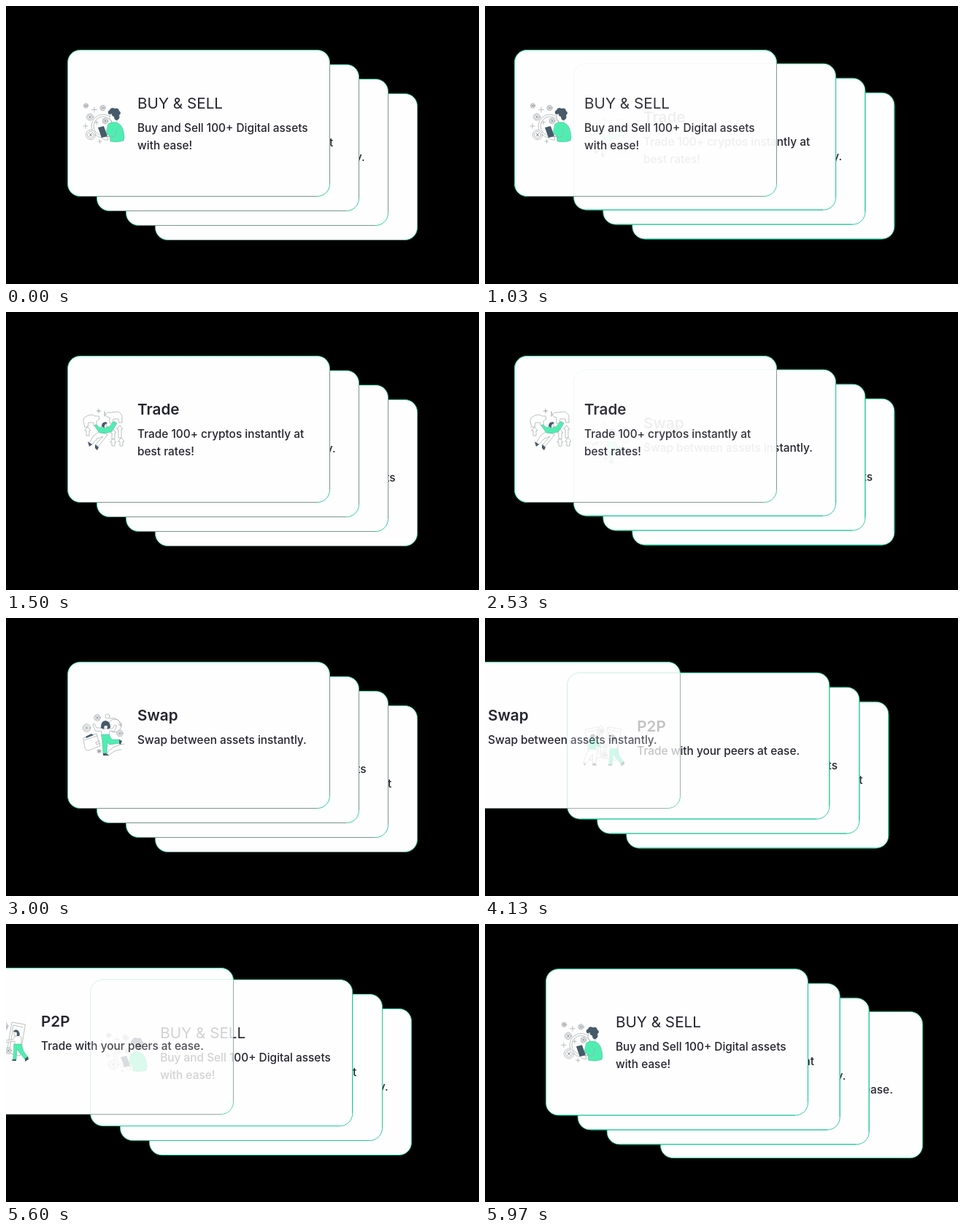
An HTML page for the animation above (6010 ms loop, 648 by 382 pixels).

```html
<!DOCTYPE html>
<html lang="en">
<head>
<meta charset="utf-8">
<title>Card stack</title>
<style>
html, body { margin: 0; width: 100%; height: 100%; overflow: hidden; background: #000; }
svg { display: block; width: 648px; height: 382px; }
text { font-family: Inter, "Open Sans", sans-serif; fill: #25252e; }
.title { font-size: 20.7px; font-weight: 600; }
.body { font-size: 15.4px; font-weight: 500; }
.panel { fill: #fefefe; stroke: #1fc795; stroke-width: .9; }
.edge { fill: none; stroke: var(--edge); stroke-width: .9; }
.art { fill: none; stroke: #a3a6a8; stroke-width: .7; stroke-linejoin: round; stroke-linecap: round; }
.art .w { fill: #fefefe; }
.art .g { fill: #50edb2; stroke: #3fae89; stroke-width: .5; }
.art .d { fill: #465a69; stroke: none; }
.art .k { stroke: #465a69; }
</style>
</head>
<body>
<svg id="stage" viewBox="0 0 648 382"><defs id="defs"></defs></svg>
<script>
const NS = 'http://www.w3.org/2000/svg';
const STEP = 100 / 3, LOOP = 6010, CYCLE = 45, HOLD = 30, REACH = 660;

const coin = (x, y, r) =>
  `<circle class="w" cx="${x}" cy="${y}" r="${r}"/><circle cx="${x}" cy="${y}" r="${r * .68}"/>` +
  `<path class="k" d="M${x - r * .25} ${y - r * .3}l${r * .5} ${r * .6}m0 ${-r * .6}l${-r * .5} ${r * .6}"/>`;
const spark = (x, y, r) => `<path d="M${x - r} ${y}h${2 * r}M${x} ${y - r}v${2 * r}"/>`;
const arrow = (x, y, h) =>
  `<path class="w" d="M${x} ${y}l4 5h-2v${h}h-4v${-h}h-2z"/>`;
const shape = (cls, d) => `<path class="${cls}" d="${d}"/>`;

const buyArt =
  '<circle cx="133" cy="165" r="16"/><circle cx="133" cy="165" r="13"/>' +
  coin(109.5, 137, 3.2) + coin(132.5, 140, 3.7) + coin(115, 152.5, 4.8) + coin(116, 177, 6.7) + coin(136, 158, 4) +
  spark(121, 142.5, 3.5) + spark(109, 165, 3.2) + spark(128.5, 186, 2.5) + spark(124, 160, 2.5) +
  shape('w', 'M143 149q-2 5 0 8l2 1v4l7 0v-10z') +
  shape('d', 'M141 149q-3-4 1-6q2-5 7-2q5-2 6 3q4 3 0 6q2 5-3 7q-4 0-4-5q-3 0-3-4z') +
  shape('g', 'M140 162q7-4 13-1q6 2 8 12q2 8 0 12q-8 3-18 1l-1-8l-5-3z') +
  shape('w', 'M131 178l8 2l1 4q-6 1-9-3z') +
  shape('d', 'M126 167l8-2l5 14l-8 2z') +
  shape('', 'M151 170q0 7-3 10l-10-1');

const tradeArt =
  shape('w', 'M107 154q-3-7 2-10q8-5 13-1l5 0l1 4l-4 3v6h-4v-4h-7l-1 6h-4z') +
  shape('w', 'M135 143q2-6 9-5l9-1q6 2 6 8v7h-4l-1-5h-7l-2 6h-3v-8q-4 0-6-4l-1-4z') +
  spark(127, 136, 3) + spark(127, 136, 1.5) +
  arrow(112, 158, 7) + arrow(147, 161, 9) + arrow(156, 156, 12) + arrow(147, 174, 5) + arrow(158, 173, 6) +
  shape('w', 'M128 164l-8 6l-6 10l4 2l7-8l8-3l-10 11l3 3l13-16z') +
  shape('d', 'M112 178l6 4l-4 3zM122 182l5 4l-2 4l-3-3z') +
  shape('g', 'M124 155l4 4q5-3 13-1l7-8l4 3l-7 11q-8 4-17 2l-7-10z') +
  shape('w', 'M134 153q5-1 4 6h-4z') +
  shape('d', 'M131 157q0-6 6-6l2 2q-5 1-4 6z');

const swapArt =
  '<circle cx="149" cy="148" r="9"/>' + shape('', 'M142 138q12-3 15 10l2-3m-2 3l-3-2') +
  coin(125, 137, 4.4) + coin(110.5, 151, 5.5) + coin(156, 158.5, 4.4) + coin(127.5, 183, 2.5) +
  '<circle cx="139" cy="135" r="3"/>' +
  shape('w', 'M106 165l18-6l5 17l-16 6q-4 0-5-4z') + shape('', 'M107 168l18-6m-2 9l5-2m-5 2l1 3l5-2') +
  shape('d', 'M109 163l8-4l3 2l-10 4z') +
  shape('w', 'M132 151l-8 0l-3-6l-2 1l3 9l9 1l0 7h10l1-8l6 1l4-8l-3-1l-3 5z') +
  shape('w', 'M134 146h5v6h-5z') +
  shape('d', 'M130 151q0-10 6-10q7 0 7 10l-4 2l0-5h-4l-1 5z') +
  shape('g', 'M131 160h10l4 7l11 0l0 5l-14 2l-3-3l-1 15h-5l-1-16z') +
  shape('d', 'M155 167l4 2l-2 5l-2-1zM133 186h5l3 3h-8z') +
  shape('', 'M137 187q8-12 25-14M140 190q7-9 18-9');

const peerArt =
  shape('w', 'M109 139l18-4l4 41l-15 5z') + shape('w', 'M158 138l-18-3l-7 42l18 4z') +
  shape('', 'M112 142l13-3l3 34M155 142l-13-3l-5 34M113 147l8 4l5-4') +
  shape('w', 'M130.500 133l5 7l-5 9l-5-9z') + coin(130.5, 141, 3.5) + coin(135, 174, 4.5) + coin(109, 153, 4) +
  shape('w', 'M115 164h10l0 10l-2 11h-4l0-13l-8 13l-4-2z') +
  shape('g', 'M115 152q5-3 9 0l6 9l-3 2l-4-3v6l-9-1z') +
  shape('w', 'M118 146q5-2 5 4l-4 2z') + shape('d', 'M116 149q0-5 5-4l2 2l-5 4z') +
  shape('w', 'M145 154q5-2 8 2l0 10h-9l0-5l-14 2v-3l11-1z') +
  shape('w', 'M143 147h4v7h-3z') + shape('d', 'M142 148q2-4 6-2q4 3 2 8h-3v-5z') +
  shape('g', 'M143 165h10l3 10l6 8l-4 3l-8-10l-3-4l-1 14h-4z') +
  shape('d', 'M158 185l4-3l1 4l-5 3zM141 186h5v2h-6zM106 184l4 2l-2 2zM119 185h4l2 3h-6z');

const cards = [
  ['BUY &amp; SELL', ['Buy and Sell 100+ Digital assets', 'with ease!'], buyArt, 400],
  ['Trade', ['Trade 100+ cryptos instantly at', 'best rates!'], tradeArt, 600],
  ['Swap', ['Swap between assets instantly.'], swapArt, 600],
  ['P2P', ['Trade with your peers at ease.'], peerArt, 600]
];

document.getElementById('defs').innerHTML = cards.map(([title, lines, art, weight], i) => `
  <g id="card${i}">
    <rect class="panel" x="84.5" y="60.5" width="359" height="201" rx="17"/>
    <path class="edge" d="M443.500 78V244M102 261.500H426"/>
    <g class="art">${art}</g>
    <text class="title" style="font-weight:${weight}" x="180" y="141">${title}</text>
    ${lines.map((line, k) => `<text class="body" x="180" y="${173 + 24 * k}">${line}</text>`).join('')}
  </g>`).join('');

// Back to front: solid part of the leaving card, entering card, three stacked cards, front card.
const stage = document.getElementById('stage');
const layers = Array.from({ length: 6 }, () => stage.appendChild(document.createElementNS(NS, 'use')));

function place(layer, card, x, y, { shown = true, opacity = 1, still = false } = {}) {
  const el = layers[layer];
  el.setAttribute('href', '#card' + card % 4);
  el.setAttribute('transform', `translate(${x} ${y})`);
  el.setAttribute('opacity', opacity);
  el.style.display = shown ? '' : 'none';
  el.style.setProperty('--edge', still ? '#84908c' : '#1fc795');
}

// Thirty steps a second, each starting on a multiple of 10 ms.
function stepAt(ms) {
  let n = Math.floor(ms / STEP) + 1;
  if (Math.round(n * STEP / 10) * 10 > ms) n--;
  return Math.min(n, 4 * CYCLE - 1);
}

let last = -1;
function draw(ms) {
  const n = stepAt(ms % LOOP);
  if (n === last) return;
  last = n;
  const first = Math.floor(n / CYCLE);
  const p = Math.max(0, (n % CYCLE - HOLD) / (CYCLE - HOLD));
  const still = p === 0;

  // Faded cards stay solid against the empty backdrop until half transparent.
  place(0, first, -REACH * p, 0, { shown: p > 0 && p <= .5, still: true });
  place(1, first, 120 + (REACH - 120) * (1 - p), 60, { shown: p >= .5 });
  for (let i = 3; i > 0; i--) {
    const x = i === 1 ? 40 - 44 * p : 40 * (i - p);
    place(5 - i, first + i, x, 20 * (i - p), { still });
  }
  place(5, first, -REACH * p, 0, { opacity: 1 - p, still: true });
}

const start = performance.now();
function tick() {
  draw(performance.now() - start);
  requestAnimationFrame(tick);
}
tick();
</script>
</body>
</html>
```
